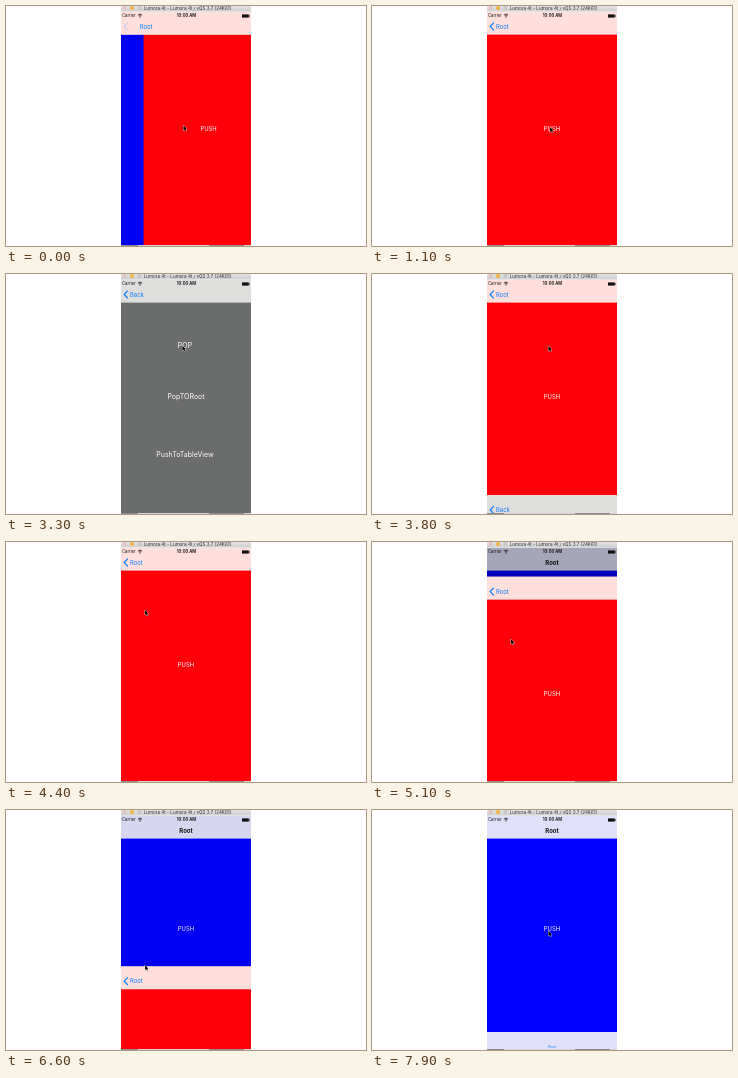
Write an HTML page with a canvas that moves like this. It is 360 by 240 pixels and loops after 8000 ms.

```html
<!DOCTYPE html>
<html>
<head>
<meta charset="utf-8">
<style>
html, body { margin: 0; width: 100%; height: 100%; overflow: hidden; background: #fff; }
canvas { display: block; }
</style>
</head>
<body>
<canvas id="stage" width="360" height="240"></canvas>
<script>
const c = document.getElementById('stage').getContext('2d');
const LOOP = 8000, LEFT = 115, TOP = 5.5, BAR_END = 28.6, W = 130, H = 233, BLUE = '#087cff';

const pages = {
  root: { body: '#0000ff', bar: '#e0e0fb', title: 'Root', labels: [['PUSH', 180, 119.5, 5.9]] },
  red: { body: '#fe0008', bar: '#ffdfdc', back: 'Root', labels: [['PUSH', 180, 123, 5.9]] },
  gray: {
    body: '#6b6c6c', bar: '#dededd', back: 'Back',
    labels: [['POP', 179, 72, 7], ['PopTORoot', 180, 123, 7], ['PushToTableView', 179, 181, 7]]
  }
};

// Key points: time, then values
const cursorPath = [
  [0, 177.5, 119.5], [1000, 178, 121], [2400, 178.5, 122], [2650, 178.5, 122], [3100, 176.5, 71.5],
  [3800, 176.5, 72], [4400, 139, 68], [5100, 139, 97], [5900, 139, 131.5], [6400, 139, 155],
  [6900, 139, 155], [7500, 176.5, 121], [8000, 176.5, 121]
];
const dragPath = [[4480, 0], [5100, 29], [5900, 67], [6400, 91]];

const clamp = v => Math.max(0, Math.min(1, v));
const progress = (t, start, length) => clamp((t - start) / length);
const easeOut = u => 1 - (1 - u) ** 3;
const smooth = u => u * u * (3 - 2 * u);

function along(path, t) {
  let i = 1;
  while (i < path.length - 1 && t > path[i][0]) i++;
  const [a, b] = [path[i - 1], path[i]];
  const u = clamp((t - a[0]) / (b[0] - a[0]));
  return a.slice(1).map((v, k) => v + (b[k + 1] - v) * u);
}

function rect(x, y, w, h, color) {
  c.fillStyle = color;
  c.fillRect(x, y, w, h);
}

function text(s, x, y, size, color, align = 'center', weight = 400) {
  c.font = `${weight} ${size}px Inter, "Liberation Sans", sans-serif`;
  c.textAlign = align;
  c.textBaseline = 'middle';
  c.fillStyle = color;
  c.fillText(s, x, y);
}

function dot(x, y, r, color) {
  c.fillStyle = color;
  c.beginPath();
  c.arc(x, y, r, 0, 7);
  c.fill();
}

function shifted(x, y, draw) {
  c.save();
  c.translate(x, y);
  draw();
  c.restore();
}

function faded(alpha, draw) {
  c.save();
  c.globalAlpha = clamp(alpha);
  draw();
  c.restore();
}

function body(page) {
  rect(LEFT, 28, W, 212, page.body);
  for (const [s, x, y, size] of page.labels) text(s, x, y, size, '#fff');
}

const bar = page => rect(LEFT, TOP, W, BAR_END - TOP, page.bar);

function chevron() {
  c.strokeStyle = BLUE;
  c.lineWidth = 1.2;
  c.beginPath();
  c.moveTo(121.8, 16.7);
  c.lineTo(118.2, 20.5);
  c.lineTo(121.8, 24.3);
  c.stroke();
}

const backLabel = (page, dx) => text(page.back, 124 + dx, 20.8, 5.9, BLUE, 'left');

function screen(page) {
  body(page);
  bar(page);
  if (page.title) {
    text(page.title, 180, 20.8, 6, '#111', 'center', 700);
    rect(LEFT, 222, W, 18, page.bar);
    text('Root', 180, 237, 3.5, BLUE);
  } else {
    chevron();
    backLabel(page, 0);
  }
}

function push(from, to, p) {
  const rest = 1 - p;
  shifted(-W * 0.3 * p, 0, () => body(from));
  rect(LEFT, 28, W, 212, `rgba(0,0,0,${0.06 * p})`);
  shifted(W * rest, 0, () => body(to));
  bar(from);
  faded(p * 1.25, () => bar(to));
  if (from.back) {
    chevron();
    faded(1 - 2 * p, () => backLabel(from, -30 * p));
  } else {
    faded(1 - rest * 4.5, chevron);
  }
  faded(p * 1.25, () => backLabel(to, 56 * rest));
}

function pop(from, to, y) {
  screen(to);
  rect(LEFT, TOP, W, 240, `rgba(0,0,0,${0.34 * (1 - y / H) ** 2})`);
  shifted(0, y, () => screen(from));
}

function content(t) {
  const { root, red, gray } = pages;
  if (t < 280) push(root, red, easeOut(progress(t, -220, 500)));
  else if (t < 2480) screen(red);
  else if (t < 2980) push(red, gray, easeOut(progress(t, 2480, 500)));
  else if (t < 3385) screen(gray);
  else if (t < 3885) pop(gray, red, H * smooth(progress(t, 3385, 500)));
  else if (t < 4480) screen(red);
  else if (t < 6850) {
    const y = along(dragPath, t)[0];
    pop(red, root, y + (H - y) * smooth(progress(t, 6400, 450)));
  } else screen(root);
}

function windowBar() {
  const g = c.createLinearGradient(0, 0, 0, TOP);
  g.addColorStop(0, '#e2e2e2');
  g.addColorStop(1, '#cfcfcf');
  rect(LEFT, 0, W, TOP, g);
  dot(118.5, 2, 2, '#e3c3c0');
  dot(126, 2, 2, '#f6b336');
  dot(133.5, 2, 2, '#c6c6c6');
  text('Lumora 4t - Lumora 4t / vQS 3.7 (24K61)', 181.5, 2.5, 4.55, '#333');
}

function statusBar() {
  text('Carrier', 116, 10.2, 4.2, '#111', 'left');
  text('10:00 AM', 180.5, 10.2, 4.2, '#111', 'center', 600);
  c.strokeStyle = '#111';
  c.lineWidth = 0.8;
  for (const r of [1.5, 3]) {
    c.beginPath();
    c.arc(134, 11.2, r, -Math.PI * 0.75, -Math.PI * 0.25);
    c.stroke();
  }
  dot(134, 11, 0.6, '#111');
  rect(236, 8.4, 6.8, 3.2, '#111');
  rect(243, 9.3, 0.7, 1.4, '#111');
}

function windowEdge() {
  rect(LEFT, 239, W, 1, '#d4d4d4');
  rect(LEFT, 239, 17, 1, '#8c8c8c');
  rect(203, 239, 35, 1, '#8c8c8c');
}

function cursor([x, y]) {
  const points = [[0, 0], [0, 5], [1.1, 4], [2, 5.8], [2.8, 5.4], [2, 3.7], [3.5, 3.7]];
  shifted(x, y, () => {
    c.beginPath();
    for (const p of points) c.lineTo(...p);
    c.closePath();
    c.strokeStyle = 'rgba(255,255,255,.8)';
    c.lineWidth = 0.8;
    c.stroke();
    c.fillStyle = '#000';
    c.fill();
  });
}

function frame(now) {
  const t = now % LOOP;
  rect(0, 0, 360, 240, '#fff');
  c.save();
  c.beginPath();
  c.rect(LEFT, TOP, W, 240);
  c.clip();
  content(t);
  c.restore();
  windowBar();
  statusBar();
  windowEdge();
  cursor(along(cursorPath, t));
  requestAnimationFrame(frame);
}
requestAnimationFrame(frame);
</script>
</body>
</html>
```
